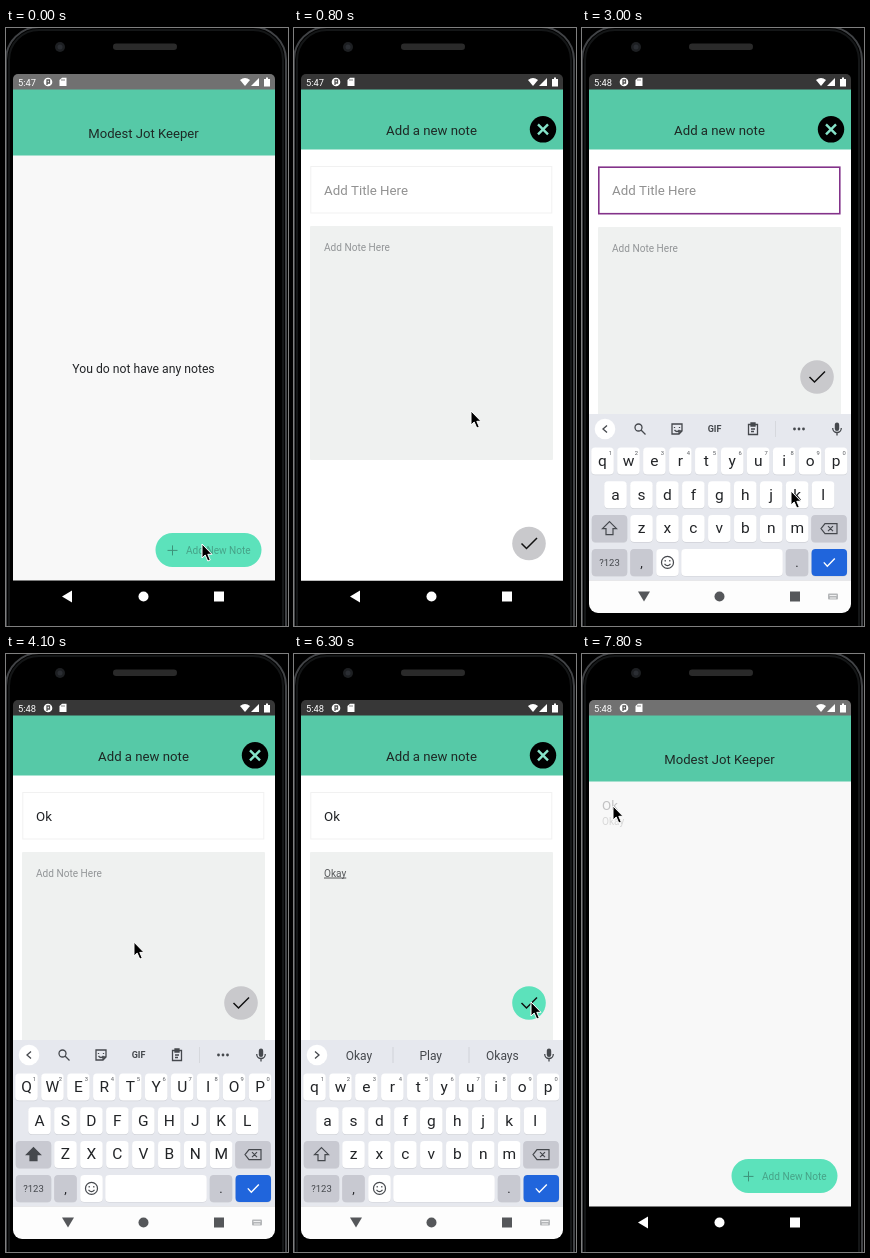
Animation, 282 px wide and 598 px high, one loop 8000 ms. Source, as an HTML page with a canvas:

```html
<!DOCTYPE html>
<html lang="en">
<head>
<meta charset="utf-8">
<title>Note app demo</title>
<style>
  html, body { margin: 0; width: 100%; height: 100%; overflow: hidden; background: #000; }
  canvas { display: block; width: 282px; height: 598px; }
</style>
</head>
<body>
<canvas></canvas>
<script>
const LOOP = 8000, STEP = 100;
const canvas = document.querySelector('canvas');
const ctx = canvas.getContext('2d');
const scale = window.devicePixelRatio || 1;
canvas.width = 282 * scale;
canvas.height = 598 * scale;

const TEAL = '#56c9a7', MINT = '#5ce2bb', INK = '#222427', GREY_KEY = '#c8c9d1';
const SCREEN_BOTTOM = 552.4;

// Timelines: [time, value]
const cursorPath = [
  [0, 196, 516], [600, 196, 516], [800, 177, 383], [1000, 176, 376], [1400, 190, 410],
  [1800, 237, 522], [2100, 237, 526], [2300, 237, 526], [2600, 226, 429], [2800, 226, 429],
  [3000, 209, 463], [3300, 209, 463], [3800, 110, 262], [4000, 110, 262], [4400, 225, 429],
  [4500, 225, 429], [4700, 210, 463], [4800, 210, 463], [5000, 151, 436], [5300, 27, 464],
  [5700, 27, 464], [5900, 147, 429], [6000, 147, 429], [6300, 237, 348], [6600, 237, 348],
  [7300, 90, 185], [7600, 31, 152], [8000, 31, 152]
];
const titles = [[0, ''], [3100, 'O'], [3300, 'Ok']];
const notes = [[0, ''], [4500, 'O'], [4800, 'Ok'], [5600, 'Oka'], [6000, 'Okay']];
const hints = [
  [0, null], [3100, ['O', 'Ok', 'I']], [4000, null], [4500, ['O', 'Ok', 'I']],
  [5600, ['Oka', 'Okay', 'Ok']], [6000, ['Okay', 'Play', 'Okays']]
];
const capitals = [[0, true], [2800, false], [4000, true], [4500, false]];

const valueAt = (track, t) => track.filter(k => k[0] <= t).pop()[1];
const progress = (t, a, b) => Math.min(1, Math.max(0, (t - a) / (b - a)));
const easeOut = p => 1 - (1 - p) ** 2;
const smooth = p => p * p * (3 - 2 * p);

function rect(x, y, w, h, fill, r = 0) {
  ctx.beginPath();
  ctx.roundRect(x, y, w, h, r);
  ctx.fillStyle = fill;
  ctx.fill();
}
function circle(x, y, r, fill) {
  ctx.beginPath();
  ctx.arc(x, y, r, 0, Math.PI * 2);
  ctx.fillStyle = fill;
  ctx.fill();
}
function path(d, x, y, { fill, stroke, width = 1.2 } = {}) {
  ctx.save();
  ctx.translate(x, y);
  const shape = new Path2D(d);
  if (fill) { ctx.fillStyle = fill; ctx.fill(shape); }
  if (stroke) { ctx.strokeStyle = stroke; ctx.lineWidth = width; ctx.stroke(shape); }
  ctx.restore();
}
function text(s, x, y, size, color = INK, align = 'left', weight = 400) {
  ctx.font = `${weight} ${size}px Roboto, sans-serif`;
  ctx.textAlign = align;
  ctx.fillStyle = color;
  ctx.fillText(s, x, y);
}
function layer(draw, alpha = 1, dy = 0) {
  ctx.save();
  ctx.globalAlpha *= alpha;
  ctx.translate(0, dy);
  draw();
  ctx.restore();
}

function drawPhone() {
  rect(0, 0, 282, 598, '#000');
  ctx.lineWidth = 2;
  for (const [inset, color] of [[0, '#414346'], [3, '#141617']]) {
    ctx.beginPath();
    ctx.roundRect(inset, inset - 1, 280 - inset * 2, 640, 33 - inset);
    ctx.strokeStyle = color;
    ctx.stroke();
  }
  circle(54, 19, 5, '#1d1f22');
  circle(54, 19, 2.5, '#2b2e33');
  rect(107, 15.5, 64, 6.5, '#2a2a2a', 3.2);
}

function drawStatus(t, modal) {
  const shade = Math.round(113 - 58 * modal);
  rect(7, 46, 262, 15.6, `rgb(${shade},${shade},${shade})`);
  text(t >= 1700 ? '5:48' : '5:47', 12, 57.5, 9.3, '#fff');
  circle(42, 54, 4.3, '#fff');
  path('M-1 3V-2H1.5V1H-1', 42, 54, { stroke: '#555', width: 1.3 });
  path('M-3.5 4V-2L-1-4.2H3.5V4Z', 57, 54, { fill: '#fff' });
  path('M-1 -3V-1M1 -3V-1', 57, 54, { stroke: '#666', width: .8 });
  path('M0 4L-5-2Q0-6 5-2Z', 239, 54, { fill: '#fff' });
  path('M-4 4L4-4V4Z', 249, 54, { fill: '#fff' });
  path('M-3-3H-1V-4.5H1V-3H3V4.5H-3Z', 261, 54, { fill: '#fff' });
}

function drawHome(t) {
  rect(7, 61, 262, 492, '#f8f8f8');
  rect(7, 61, 262, 66.6, TEAL);
  text('Modest Jot Keeper', 137.5, 110, 13.1, '#1e2925', 'center');
  if (t < 6500) {
    text('You do not have any notes', 137.5, 345, 12.2, INK, 'center');
  } else {
    layer(() => {
      text('Ok', 20, 156, 13.3);
      text('Okay', 20, 171, 10.1, '#777');
    }, t >= 7600 ? .25 : 1);
  }
  layer(() => {
    rect(149.5, 505, 106, 34, MINT, 17);
    path('M-5 0H5M0-5V5', 166.5, 522.4, { stroke: '#3d9279', width: 1 });
    text('Add New Note', 180, 526.3, 10.1, '#47a388');
  }, t >= 100 && t < 300 ? .85 : 1);
}

function drawModal(t) {
  const focused = t >= 2200 && t < 4000;
  const resized = t >= 2200;
  const title = valueAt(titles, t), note = valueAt(notes, t);
  const shift = focused ? 1 : 0;

  rect(7, 61, 262, 492, '#fff');
  rect(7, 61, 262, 60.6, TEAL);
  text('Add a new note', 137.5, 106.8, 13.2, '#1e2925', 'center');
  circle(249, 101.3, 13.2, '#000');
  path('M-5-5L5 5M5-5L-5 5', 249, 101.3, { stroke: '#86e3c9', width: 2.4 });

  ctx.strokeStyle = focused ? '#83338a' : '#f1f1f1';
  ctx.lineWidth = focused ? 1.6 : 1;
  ctx.strokeRect(16.8, 138.5 + shift * .7, 241, 46.5);
  text(title || 'Add Title Here', 30, 167 + shift * .4, 13.3, title ? INK : '#929292');

  rect(16, 198 + shift, 243, 234, '#eff1f0', 1);
  text(note || 'Add Note Here', 30, 222.5 + shift, 10.1, note ? '#57595b' : '#929597');
  if (note) rect(30, 223.6, ctx.measureText(note).width, .8, '#57595b');

  const y = resized ? 349 : 515.5;
  circle(235, y, 16.8, t >= 4500 ? MINT : '#c9c9cc');
  path('M-7.5 0L-2.5 5L8-5.5', 235, y, { stroke: '#111', width: 1.5 });
}

function drawKey(x, y, w, fill = '#fff') {
  rect(x - w / 2, y - 12.8, w, 27, '#cfd1d7', 4);
  rect(x - w / 2, y - 13.5, w, 27, fill, 4);
}

function drawToolbar(words) {
  const icon = { stroke: '#45484d', width: 1.3 };
  circle(23, 401, 10.3, '#fff');
  path(words ? 'M-2-3.5L2 0L-2 3.5' : 'M2-3.5L-2 0L2 3.5', 23, 401, icon);
  if (words) {
    words.forEach((word, i) => text(word, 65 + i * 71.7, 405.5, 12, '#45484d', 'center'));
    rect(98.5, 393, 1, 16, '#cfd1d7');
    rect(174.5, 393, 1, 16, '#cfd1d7');
  } else {
    path('M2-1.5A3.5 3.5 0 1 1-5-1.5A3.5 3.5 0 1 1 2-1.5M1 1L5.5 5.5', 58, 401, icon);
    path('M-5-5H5V2L2 5H-5ZM2 5V2H5M-2.5-2V-1M2.5-2V-1M-2.5 1Q0 4 2.5 1', 95, 401, icon);
    text('GIF', 132.5, 404.3, 9, '#45484d', 'center', 700);
    path('M-4.5-4.5H4.5V5.5H-4.5ZM-2-6H2V-3H-2ZM-2 0H2M-2 2.5H1', 171, 401, icon);
    rect(193, 393, 1, 16, '#d6d8dd');
    for (const x of [212.5, 217, 221.5]) circle(x, 401, 1.4, '#45484d');
  }
  rect(252.8, 394.5, 4.4, 8.5, '#45484d', 2.2);
  path('M-4.3-1A4.3 4.5 0 0 0 4.3-1M0 3.5V6.5', 255, 401, icon);
}

function drawKeyboard(t) {
  const upper = valueAt(capitals, t);
  const rows = ['qwertyuiop', 'asdfghjkl', 'zxcvbnm'];
  rect(7, 386, 262, 167, '#e6e8ee');
  drawToolbar(valueAt(hints, t));
  rows.forEach((row, r) => {
    const startX = [20.5, 33.5, 59.5][r], y = 433 + r * 33.8;
    [...row].forEach((letter, i) => {
      const x = startX + i * 25.95;
      drawKey(x, y, 22.5);
      text(upper ? letter.toUpperCase() : letter, x, y + 4.8, 15.5, INK, 'center');
      if (r === 0) text((i + 1) % 10, x + 8, y - 6, 5.8, '#55585d', 'center');
    });
  });
  drawKey(27.5, 500.6, 35.5, GREY_KEY);
  path('M0-7L7 0H3.5V6H-3.5V0H-7Z', 27.5, 500.6, { fill: upper && '#45484d', stroke: '#45484d' });
  drawKey(247, 500.6, 35.5, GREY_KEY);
  path('M-8 0L-4-5H8V5H-4ZM-1-2.5L4 2.5M4-2.5L-1 2.5', 247, 500.6, { stroke: '#45484d' });

  drawKey(27.5, 534.4, 35.5, GREY_KEY);
  text('?123', 27.5, 538, 9.5, '#45484d', 'center');
  drawKey(59.5, 534.4, 22.5, GREY_KEY);
  text(',', 59.5, 539, 13, INK, 'center');
  drawKey(85.5, 534.4, 22.5);
  path('M6 0A6 6 0 1 1-6 0A6 6 0 1 1 6 0M-2.3-2.5V-1M2.3-2.5V-1M-3 1.5Q0 5 3 1.5', 85.5, 534.4, { stroke: '#45484d' });
  drawKey(150, 534.4, 101.5);
  drawKey(215, 534.4, 22.5, GREY_KEY);
  text('.', 215, 539, 13, INK, 'center');
  drawKey(247.3, 534.4, 35.5, '#2065dc');
  path('M-5.5 0L-2 3.8L5.5-4', 247.3, 534.4, { stroke: '#fff', width: 1.4 });
}

function drawNavigation(t, keyboard) {
  layer(() => {
    path('M-5 0L5-6V6Z', 61, 568.5, { fill: '#fff' });
    circle(137.5, 568.5, 5, '#fff');
    rect(208, 563.5, 10, 10, '#fff');
  }, 1 - keyboard);
  layer(() => {
    rect(7, SCREEN_BOTTOM, 262, 585 - SCREEN_BOTTOM, '#fdfdfd', [0, 0, 9, 9]);
    ctx.globalAlpha *= t < 2200 ? .12 : 1;
    path('M-6-4.5H6L0 5.5Z', 62, 568, { fill: '#55575a' });
    circle(137.5, 568.5, 5, '#55575a');
    rect(208, 563.5, 10, 10, '#55575a');
    rect(246, 565.5, 10, 6, '#b5b7b9', 1);
    path('M-3.5-1H3.5M-3 1.5H3', 251, 568.5, { stroke: '#fff', width: .8 });
  }, keyboard);
}

function drawCursor(t) {
  const next = Math.max(1, cursorPath.findIndex(k => k[0] > t));
  const [t0, x0, y0] = cursorPath[next - 1], [t1, x1, y1] = cursorPath[next];
  const p = smooth(progress(t, t0, t1));
  path('M0 0V14L3.2 11L5.8 17L8.3 16L5.8 10.3H10Z', x0 + (x1 - x0) * p, y0 + (y1 - y0) * p,
    { fill: '#000', stroke: '#fff', width: 1 });
}

function render(t) {
  const modal = t < 6500 ? easeOut(progress(t, 500, 800)) : 1 - easeOut(progress(t, 6500, 6900));
  const keyboard = t < 6500 ? easeOut(progress(t, 1800, 2100)) : 1 - easeOut(progress(t, 6500, 6800));
  ctx.setTransform(scale, 0, 0, scale, 0, 0);
  drawPhone();
  ctx.save();
  ctx.beginPath();
  ctx.roundRect(7, 46, 262, SCREEN_BOTTOM - 46, [5, 5, 0, 0]);
  ctx.clip();
  drawHome(t);
  if (modal > 0) layer(() => drawModal(t), 1, (1 - modal) * 491);
  if (keyboard > 0) layer(() => drawKeyboard(t), 1, (1 - keyboard) * 167);
  drawStatus(t, modal);
  ctx.restore();
  drawNavigation(t, keyboard);
  drawCursor(t);
}

const start = performance.now();
function frame() {
  const elapsed = (performance.now() - start) % LOOP;
  render(Math.floor(elapsed / STEP) * STEP);
  requestAnimationFrame(frame);
}
frame();
</script>
</body>
</html>
```
